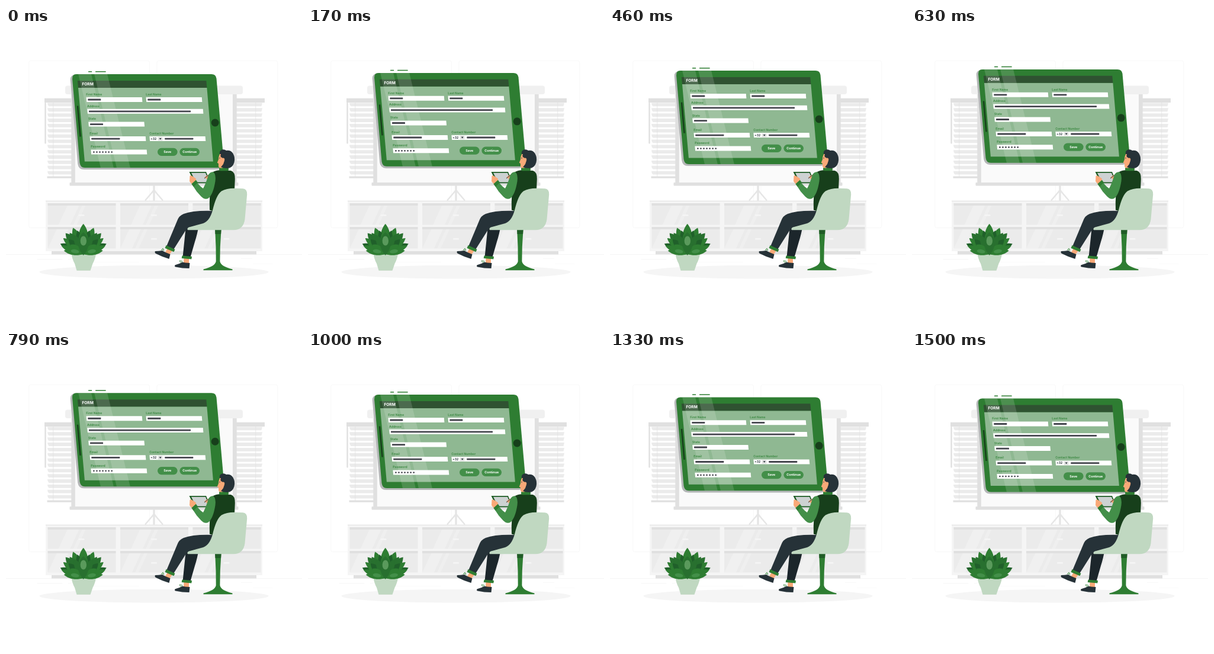
An HTML page with a canvas that plays this animation: 500x500 px, repeating every 1540 ms.

```html
<!DOCTYPE html>
<html lang="en">
<head>
<meta charset="utf-8">
<title>Form</title>
<style>
html, body { margin: 0; width: 100%; height: 100%; overflow: hidden; background: #fff; }
canvas { display: block; width: 500px; height: 500px; }
</style>
</head>
<body>
<canvas id="stage"></canvas>
<script>
const canvas = document.getElementById('stage');
const ctx = canvas.getContext('2d');
const ratio = Math.max(1, window.devicePixelRatio || 1);
canvas.width = canvas.height = 500 * ratio;

const LOOP = 1540, LEAD = 38, RISE = 10;
const GREEN = '#2e7d32', DARK = '#173f1b', MID = '#438f49', PALE = '#c0d8c1';
const NAVY = '#263238', SKIN = '#f9a978', G1 = '#e0e0e0', G2 = '#ebebeb', G3 = '#f5f5f5';

function shape(color, d) {
  ctx.fillStyle = color;
  ctx.fill(new Path2D(d));
}
function line(color, width, d) {
  ctx.strokeStyle = color;
  ctx.lineWidth = width;
  ctx.stroke(new Path2D(d));
}
function rect(color, x, y, w, h, r = 0) {
  ctx.fillStyle = color;
  ctx.beginPath();
  ctx.roundRect(x, y, w, h, r);
  ctx.fill();
}
function oval(color, x, y, rx, ry = rx, turn = 0) {
  ctx.fillStyle = color;
  ctx.beginPath();
  ctx.ellipse(x, y, rx, ry, turn, 0, Math.PI * 2);
  ctx.fill();
}
function text(str, x, y, size, color, align = 'left') {
  ctx.font = `700 ${size}px Inter, sans-serif`;
  ctx.textAlign = align;
  ctx.fillStyle = color;
  ctx.fillText(str, x, y);
}

function drawWall() {
  ctx.strokeStyle = G3;
  ctx.lineWidth = 0.7;
  for (const x of [38.8, 255]) {
    ctx.beginPath();
    ctx.roundRect(x, 55.2, 203.7, 282.4, 3);
    ctx.stroke();
  }
  rect(G2, 0, 382.3, 500, 0.4);
  for (const [x, y, w] of [[417, 398.4, 33], [397, 389.1, 19], [52.5, 390.8, 43], [104.5, 390.8, 6], [131.5, 395, 93]])
    rect(G2, x, y, w, 0.35);
  oval(G3, 250, 412.2, 193.5, 11.3);
}

function drawBlind(left, right, cord) {
  for (let i = 0; i < 14; i++) {
    const y = 126.5 + i * 8.86;
    shape(G2, `M${left} ${y}H${right}l-1.5 5.8H${left + 2.5}Q${left} ${y + 4} ${left} ${y}Z`);
  }
  rect(G1, left - 0.5, 250.5, right - left, 3.2);
  rect(G1, cord, 126, 0.7, 126);
}

function drawScreen() {
  drawBlind(70, 114, 79.5);
  drawBlind(387, 433, 421.5);
  rect(G1, 65, 118.8, 50, 7.2);
  rect(G1, 386, 118.8, 51, 7.2);
  rect(G1, 65.3, 126, 2.4, 69.5, 1);
  rect('#fafafa', 116, 110, 268, 152);
  rect(G1, 110.3, 110, 6.5, 152);
  rect(G1, 383, 110, 6.7, 152);
  rect('#f0f0f0', 100, 97.5, 300, 14.5, 4);
  rect(G1, 107.5, 261, 285, 5.6, 1);
}

function drawCabinet() {
  rect(G1, 77, 376, 346, 6.5);
  rect(G3, 67, 292, 366, 85);
  for (const x of [70.5, 193, 315.5]) for (const y of [296, 336]) {
    const slide = (y - 296) * -0.45;
    rect(G2, x, y, 115, 36.5);
    rect(G1, x, y, 115, 4);
    const gloss = (a, w) => shape('rgba(255,255,255,.22)',
      `M${x + a + slide + 15} ${y + 4}h${w}l-15 32.5h${-w}Z`);
    gloss(18, 20);
    gloss(43, 6);
    rect(G3, x + 52, y + 19, 10, 2.6, 1.3);
  }
  rect(G1, 67, 291.7, 366, 1);
  rect('#e6e6e6', 248.2, 266, 3.6, 25.7);
  line('#e6e6e6', 2.5, 'M249 275L235 291.5M251 275L265 291.5');
  rect('#e6e6e6', 247, 274.5, 6, 3.5, 1);
}

// Leaf growing from (x, y) with its tip at (tx, ty).
function leaf(color, x, y, tx, ty, width) {
  const dx = tx - x, dy = ty - y, len = Math.hypot(dx, dy);
  const at = (along, side) =>
    `${x + dx * along - dy / len * side * width} ${y + dy * along + dx / len * side * width}`;
  shape(color, `M${x} ${y}C${at(0.35, 1)} ${at(0.75, 1)} ${tx} ${ty}C${at(0.75, -1)} ${at(0.35, -1)} ${x} ${y}Z`);
}

function drawPlant() {
  shape(PALE, 'M110 379H152.500Q151 390 146.500 398L142.500 409.700H119.500L116 398Q111.500 390 110 379Z');
  const pair = (color, dx, ty, width, y = 382) => {
    leaf(color, 130.7, y, 130.7 - dx, ty, width);
    leaf(color, 130.7, y, 130.7 + dx, ty, width);
  };
  const deep = '#20602a', soft = '#28702f';
  pair(soft, 30, 346.5, 9.5);
  pair(GREEN, 17.5, 337.5, 9.5);
  leaf(GREEN, 130.7, 382, 130.7, 330.7, 11);
  pair(deep, 39, 364.5, 8);
  pair(deep, 10, 342, 8);
  pair(GREEN, 34, 355, 8);
  pair(soft, 23, 346, 9);
  leaf(GREEN, 130.7, 382, 130.7, 339, 11);
  pair(GREEN, 37, 368, 7);
  pair(deep, 25, 357, 8);
  pair(soft, 15, 350, 8);
  pair(GREEN, 33, 376, 6);
  pair(GREEN, 22, 366, 8);
  leaf(soft, 130.7, 384, 130.7, 345, 12);
  oval('#5a9a5c', 130.8, 359.5, 5.2, 8);
  oval(MID, 116.5, 377.2, 7, 3.2, 0.15);
  oval(MID, 145, 377.2, 7, 3.2, -0.15);
}

function drawField(label, x, y, width, bar, barX = x + 3) {
  text(label, x, y - 3.1, 5.1, '#438d49');
  shape('#fff', `M${x + 0.2} ${y}h${width}l.7 8h${-width}Z`);
  if (bar) rect('#46474f', barX, y + 2.7, bar, 2.8, 0.4);
}

function drawTablet() {
  const face = 'M119 78.600H347Q354.500 78.600 355.500 86L368 228Q368.500 236.500 360 236.500H133Q125.500 236.500 124.500 228L112 86.500Q111.500 78.600 119 78.600Z';
  rect(GREEN, 139, 73.4, 6.2, 1.5, 0.5);
  rect(GREEN, 151, 73.4, 17.7, 1.5, 0.5);
  shape('#b4b7b7', 'M119 78.600Q108 80 108.700 88L121.200 230Q122.500 239.600 132 239.600H356Q363 239 366 234L140 232Z');
  shape(GREEN, face);
  shape('#8fb892', 'M122 101.500H339.400L349.900 226H132.900Z');
  shape('#2f5231', 'M120.800 89.500H338.300L339.400 101.500H122Z');

  ctx.save();
  ctx.clip(new Path2D(face));
  shape('rgba(255,255,255,.14)', 'M122 78H144L182 237H160Z');
  shape('rgba(255,255,255,.14)', 'M149 78H171L210 237H187Z');
  ctx.restore();

  line(DARK, 2.5, 'M121 132L125.500 184');
  oval(DARK, 353.2, 160.5, 6.5);

  text('FORM', 128.4, 97.5, 6.6, '#fff');
  drawField('First Name', 135.3, 117.4, 94.2, 22);
  drawField('Last Name', 236.3, 117.4, 94.2, 22);
  drawField('Address', 137, 137.2, 195.5, 172);
  drawField('State', 139, 159.1, 94.2, 22);
  drawField('Email', 141.3, 183.6, 94.2, 48);
  drawField('Contact Number', 242.2, 183.6, 94.2, 48, 268.3);
  drawField('Password', 143.2, 206, 94.2, 0);
  text('+32', 244.3, 189.3, 5, NAVY);
  rect(G1, 256.8, 184.7, 7.6, 6);
  shape(NAVY, 'M258.800 186.500H262.600L260.700 189.300Z');
  for (let i = 0; i < 7; i++) oval('#46474f', 148.4 + i * 5.05, 210.1, 1.35);

  for (const [label, x] of [['Save', 256], ['Continue', 293.4]]) {
    rect(MID, x, 203.2, 33.6, 13.2, 6.6);
    text(label, x + 16.8, 211.7, 5.4, '#fff', 'center');
  }
}

function drawLegs() {
  shape('#1c262b', 'M304 334L326 332Q323 349 319 361L311 389L298.500 387Z');
  shape(NAVY, 'M349 309Q316 308 300 314Q292 317 289 326L271 369L282.500 375L304 341Q309 334 320 333L347 332Z');

  shape(SKIN, 'M273 372L281 376L276 383L269 379Z');
  shape(GREEN, 'M270.500 367L285.500 374L283.500 378.300L268.500 371.800Z');
  shape(NAVY, 'M252 377Q257 376.800 264 376L269 378.700L277.500 382.200L275.500 390Q264 386.700 252.500 380.700Q250.500 378.700 252 377Z');
  line(MID, 0.9, 'M262 375.500L265 372L267 375.500L263 374.500');

  shape(SKIN, 'M300.500 388H309L309 398L300 397Z');
  shape(GREEN, 'M297.500 384.500L314 386L313.300 390.500L296.700 389Z');
  shape(NAVY, 'M286 400.300Q292 399 298 395.500L303 396.500L310.500 397L309.500 406Q298 406 286 403.500Q284 402 286 400.300Z');
  line(MID, 0.9, 'M295 396.500L293 393L298 394L296 396.500');
}

function drawChair() {
  shape(GREEN, 'M353.200 341H363.500L361.800 370L361.400 394Q362.500 402.500 382.500 407.500V409.300H333.500V407.500Q353.500 402.500 354.700 394L354.500 370Z');
  shape('#205c26', 'M353.200 341H363.500L363.100 348H353.500Z');
  shape(PALE, 'M364 275.500Q372 271 386 270.800L400 271.300Q407.500 272 407.200 281L403.500 323Q401 341.300 384 341.300H307Q305 338.500 309 336.500L333 330Q344 326 349 308Q355 282 364 275.500Z');
}

function drawBody() {
  shape(SKIN, 'M362 226H373V239H363Z');
  shape(DARK, 'M350 243Q355 240 364 240L380 241Q387 243 386.800 255L385.500 285L352 310L344 307.500Q343 283 347 262Z');
  rect(GREEN, 360, 235.3, 16, 6, 2.5);

  shape('#1d5b24', 'M309.500 243H338L346 262.200H319Z');
  shape('#cdd2d2', 'M313 244.800H337L343 260.500H321Z');
  shape(SKIN, 'M335 252L341 248L345 249V258L339 255Z');
  line(NAVY, 1, 'M335 254L344 247');

  shape(SKIN, 'M310.500 250Q312 248 316 251L320.500 254L322 260L315 265L310 259Z');
  shape(MID, 'M350 243Q355 247 353.500 259Q350 281 342 287.500Q336 291 329.500 284.500Q321 276 315 265.500L321.500 259.500Q328 268 333 271Q338 262 341.500 249Q344 243 350 243Z');
  shape(GREEN, 'M313.300 263.500L320.800 256.800L324 261L317 268Z');
}

function drawHead() {
  shape(SKIN, 'M362 211Q358.500 218 359 222L356.800 227.500L359 229V234Q360 237 365 236.500L373 233V214Z');
  shape(NAVY, 'M361 213Q359.500 207 366 205.300Q370 205 372 207Q380 206 383.500 212Q387.500 219 385.500 227Q383 236.500 374 237Q368 237 363 235L367 230L369 224L365 219Q361 218 363 213Z');
  oval(SKIN, 366.6, 222.6, 2.6, 3.2, 0.2);
  line(NAVY, 0.8, 'M359.800 220L362 219.500');
}

function draw(time) {
  const phase = ((time + LEAD) % LOOP) / LOOP;
  const lift = RISE * (1 - Math.abs(1 - 2 * phase));
  ctx.setTransform(ratio, 0, 0, ratio, 0, 0);
  ctx.fillStyle = '#fff';
  ctx.fillRect(0, 0, 500, 500);
  drawWall();
  drawScreen();
  drawCabinet();
  ctx.save();
  ctx.translate(0, -lift);
  drawTablet();
  ctx.restore();
  drawPlant();
  drawBody();
  drawHead();
  drawLegs();
  drawChair();
}

const start = performance.now();
function tick() {
  draw(performance.now() - start);
  requestAnimationFrame(tick);
}
tick();
</script>
</body>
</html>
```
